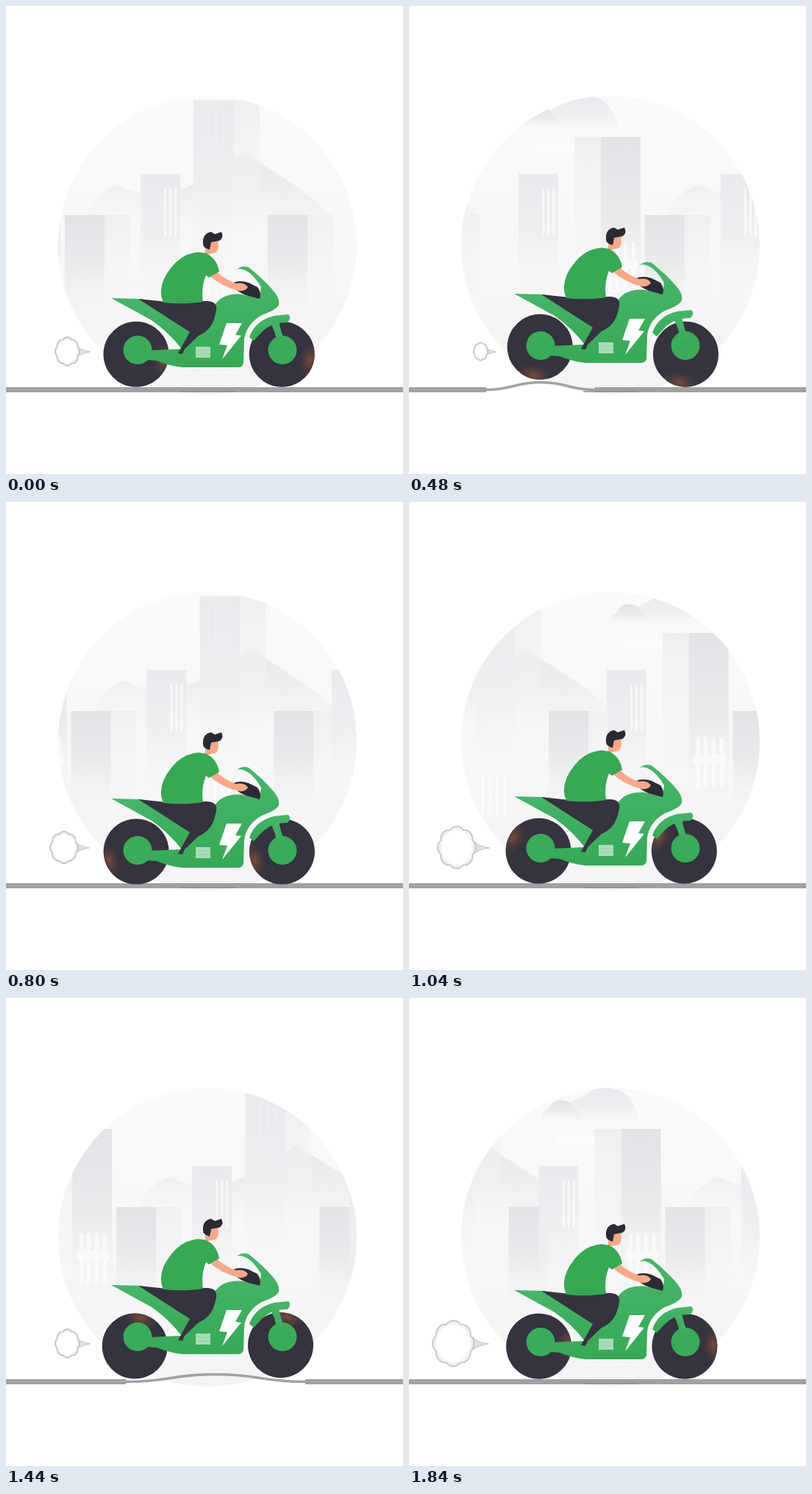
An HTML page for the animation above (1920 ms loop, 540 by 636 pixels).

```html
<!DOCTYPE html>
<html lang="en">
<head>
<meta charset="utf-8">
<title>City ride</title>
<style>
html, body { margin: 0; width: 100%; height: 100%; overflow: hidden; background: #fff; }
svg { display: block; width: 540px; height: 636px; }
</style>
</head>
<body>
<svg viewBox="0 0 540 636">
  <defs>
    <linearGradient id="sky" x2="0" y2="1">
      <stop stop-color="#fafafb"/><stop offset="1" stop-color="#f3f4f5"/>
    </linearGradient>
    <linearGradient id="dark" x2="0" y2="1">
      <stop stop-color="#e2e3e6"/><stop offset=".45" stop-color="#e9eaec"/><stop offset="1" stop-color="#f3f4f5" stop-opacity="0"/>
    </linearGradient>
    <linearGradient id="soft" x2="0" y2="1">
      <stop stop-color="#e9eaed"/><stop offset=".5" stop-color="#eeeff1"/><stop offset="1" stop-color="#f4f5f6" stop-opacity="0"/>
    </linearGradient>
    <linearGradient id="pale" x2="0" y2="1">
      <stop stop-color="#eeeff1"/><stop offset="1" stop-color="#f5f5f7" stop-opacity="0"/>
    </linearGradient>
    <linearGradient id="green" x2="0" y2="1">
      <stop stop-color="#48b56b"/><stop offset="1" stop-color="#37a956"/>
    </linearGradient>
    <radialGradient id="rust">
      <stop stop-color="#87503c" stop-opacity=".85"/><stop offset="1" stop-color="#5a3c3a" stop-opacity="0"/>
    </radialGradient>
    <radialGradient id="smoke">
      <stop offset=".75" stop-color="#fff"/><stop offset="1" stop-color="#e4e4e4"/>
    </radialGradient>
    <clipPath id="disc"><circle cx="274" cy="325" r="203"/></clipPath>
    <clipPath id="tyre"><circle r="44.5"/></clipPath>

    <g id="slim">
      <path d="M0 228h54v170H0z" fill="url(#soft)"/>
      <path d="M32 248h3v64h-3zM39 248h3v64h-3zM46 248h3v64h-3z" fill="#fff" opacity=".65"/>
    </g>
    <g id="low">
      <path d="M0 284h54v150H0z" fill="url(#dark)"/>
      <path d="M54 284h35v130H54z" fill="url(#pale)"/>
    </g>
    <g id="city">
      <path d="M25 173Q32 142 62 133Q80 117 104 124Q130 130 138 173Z" fill="url(#soft)"/>
      <path d="M199 284Q214 258 236 246Q245 241 255 248Q275 258 310 254L337 310H199Z" fill="url(#pale)"/>
      <path d="M335 248Q375 228 417 200L467 232Q508 258 542 292V320H310V254Z" fill="url(#dark)" opacity=".7"/>
      <path d="M1 168Q2 154 14 150Q20 137 32 139Q46 140 47 150Q60 154 61 168Z" fill="url(#dark)"/>
      <ellipse cx="52" cy="193" rx="32" ry="6" fill="#fff" opacity=".5"/>
      <use href="#slim"/>
      <path d="M76 178h36v230H76z" fill="url(#pale)"/>
      <path d="M112 178h54v250h-54z" fill="url(#dark)"/>
      <path d="M122 320h5v68h-5zM132 320h5v68h-5zM143 320h5v68h-5zM154 320h5v68h-5zM118 343h44v14h-44z" fill="#fff" opacity=".6"/>
      <use href="#low" x="172"/>
      <use href="#slim" x="275"/>
      <path d="M347 128h55v240h-55z" fill="url(#soft)"/>
      <path d="M402 128h35v220h-35z" fill="url(#pale)"/>
      <path d="M358 138v90M368 138v90M378 138v90M388 138v90" stroke="#eff0f2" stroke-width="4" opacity=".5"/>
      <path d="M358 372v54M368 372v54M378 372v54M388 372v54" stroke="#fff" stroke-width="3" opacity=".6"/>
      <use href="#low" x="448"/>
    </g>
    <g id="wheel">
      <circle r="44.5" fill="#34333e"/>
      <g clip-path="url(#tyre)"><ellipse cx="39" rx="15" ry="25" fill="url(#rust)"/></g>
    </g>
  </defs>

  <circle cx="274" cy="325" r="203" fill="url(#sky)"/>
  <g id="skyline" clip-path="url(#disc)"></g>
  <g id="puff" stroke="#c2c2c2" stroke-linejoin="round">
    <path id="tail" fill="#e2e2e2" stroke-width="1"/>
    <path id="cloud" fill="url(#smoke)" stroke-width="1.6"/>
  </g>
  <path id="ground" stroke="#a1a1a1" stroke-width="7"/>
  <path id="shade" d="M237 524h75" stroke="#8e8e92" stroke-width="1.5"/>
  <path id="bump" fill="none" stroke="#a1a1a1" stroke-width="3.5"/>
  <use id="rear" href="#wheel"/>
  <use id="front" href="#wheel"/>

  <g id="bike" fill="url(#green)">
    <circle cx="179" cy="467.5" r="19.5" fill="#3aab58"/>
    <circle cx="376" cy="467.5" r="19.5" fill="#3aab58"/>
    <path d="M143 397L182 398L222 405L256 440L238 465Q222 444 198 427Z"/>
    <path d="M357 427L371 425Q372 440 382 462L370 466Q368 442 357 427Z"/>
    <path d="M331 450Q339 427 365 421L384 419Q389 424 383 430Q361 430 348 443L337 455Z"/>
    <path d="M178 480L194 468L240 466L283 408C290 395 305 390 322 392L345 397L347 382Q337 365 327 360Q320 356 314 358Q321 352 330 355Q351 372 362 385Q373 397 371 406Q368 413 348 420Q327 432 324 453L323 485Q322 491 315 491H240Q222 489 205 482Z"/>
    <path d="M180 398L218 402L275 401Q290 402 285 418Q281 440 262 448L243 466L240 473L234 472L250 443Z" fill="#34333e"/>
    <path d="M309 376Q318 372 330 376L342 382Q348 390 345 398L330 394Q310 388 309 376Z" fill="#2c2b35"/>
    <path d="M276 366L286 361Q300 373 313 377Q324 375 329 382Q326 388 317 387Q294 382 276 366Z" fill="#f6a989"/>
    <path d="M276 318L288 317L289 326Q289 336 280 336L270 339L272 325Z" fill="#f6a989"/>
    <path d="M268 323Q267 309 279 307L284 310L293 307Q297 315 290 319L279 321L277 331Q268 329 268 323Z" fill="#2b2a33"/>
    <path d="M214 403Q204 381 225 355Q240 336 262 334.500L272 336Q287 343 290 361L276 369L272 366Q265 383 268 402Q240 406 214 403Z" fill="#37a854"/>
    <path d="M300 431L321 431L312 447L320 448L294 480L301 461L290 460Z" fill="#fff"/>
    <path d="M258 463h20v15h-20z" fill="#a8ddb7"/>
    <path d="M258 468h20M258 473h20" stroke="#8fd0a2" stroke-width="1"/>
  </g>
</svg>
<script>
const STEP = 80, STEPS = 24, GROUND = 521.5;
const el = id => document.getElementById(id);
const set = (id, name, value) => el(id).setAttribute(name, value);

const cityStarts = [-92, 497.5, 1024, 1513];
const cityCopies = cityStarts.map(() => {
  const copy = document.createElementNS('http://www.w3.org/2000/svg', 'use');
  copy.setAttribute('href', '#city');
  return el('skyline').appendChild(copy);
});

// Vertical travel of the frame on its suspension: [step, offset]
const bounce = [[0, 0], [4, -4.5], [6, -6], [10, 6], [13, 3], [18, -7], [23, 0], [24, 0]];
const bumps = [{ at: 671, half: 74 }, { at: 1761, half: 122 }];

function bodyOffset(k) {
  const i = bounce.findIndex((_, n) => k < bounce[n + 1][0]);
  const [a, y] = bounce[i], [b, z] = bounce[i + 1];
  const u = (k - a) / (b - a);
  return y + (z - y) * (1 - Math.cos(Math.PI * u)) / 2;
}

function bumpHeight(x, k) {
  return bumps.reduce((sum, { at, half }) => {
    const u = (x - at + 82 * k) / half;
    return Math.abs(u) < 1 ? sum + 10 * Math.cos(u * Math.PI / 2) ** 2 : sum;
  }, 0);
}

// The road line is interrupted wherever a bump lifts it.
function drawRoad(k) {
  let ground = `M0 ${GROUND}`, curve = '';
  for (const { at, half } of bumps) {
    const c = at - 82 * k, q = half / 2, left = c - half, right = c + half;
    if (right < 0 || left > 540) continue;
    ground += `H${Math.max(0, left)}M${Math.min(540, right)} ${GROUND}`;
    curve += `M${left} ${GROUND}C${c - q} ${GROUND} ${c - q} 511.5 ${c} 511.5S${c + q} ${GROUND} ${right} ${GROUND}`;
  }
  set('ground', 'd', ground + 'H540');
  set('bump', 'd', curve);
  set('shade', 'opacity', 1 - bumpHeight(274, k) / 10);
}

function cloudPath(cx, cy, rx, ry, lobes = 8) {
  let d = '';
  for (let i = 0; i <= lobes; i++) {
    const a = (i + .5) * 2 * Math.PI / lobes;
    const x = cx + rx * .88 * Math.cos(a), y = cy + ry * .88 * Math.sin(a);
    d += i ? `A${rx * .42} ${ry * .42} 0 0 1 ${x} ${y}` : `M${x} ${y}`;
  }
  return d + 'Z';
}

function drawPuff(k) {
  const p = (k + 3) % 9;
  const x = 97.5 - 4.65 * p, rx = 10 + 2.35 * p, ry = 12.5 + 2.4 * p;
  const tip = 118 - 1.2 * p, edge = x + rx - 2;
  set('cloud', 'd', cloudPath(x, 469.5, rx, ry));
  set('tail', 'd', `M${edge} ${469 - ry * .25}Q${edge + 5} 468 ${tip} 470Q${edge + 6} 472 ${edge} ${470 + ry * .25}Z`);
}

function placeWheel(id, x, k, body) {
  const angle = 15 * k + 12;
  const sway = 1.5 * Math.sin(angle * Math.PI / 180);
  const y = 473.3 + .3 * Math.max(0, body) - bumpHeight(x, k);
  set(id, 'transform', `translate(${x + sway} ${y}) rotate(${angle})`);
}

function draw(ms) {
  const k = Math.floor(ms / STEP) % STEPS;
  const body = bodyOffset(k);
  cityCopies.forEach((copy, i) => copy.setAttribute('x', cityStarts[i] - 58.1 * k));
  set('bike', 'transform', `translate(0 ${body})`);
  drawRoad(k);
  placeWheel('rear', 176.7, k, body);
  placeWheel('front', 375, k, body);
  drawPuff(k);
}

const start = performance.now();
function tick() {
  draw(performance.now() - start);
  requestAnimationFrame(tick);
}
tick();
</script>
</body>
</html>
```
